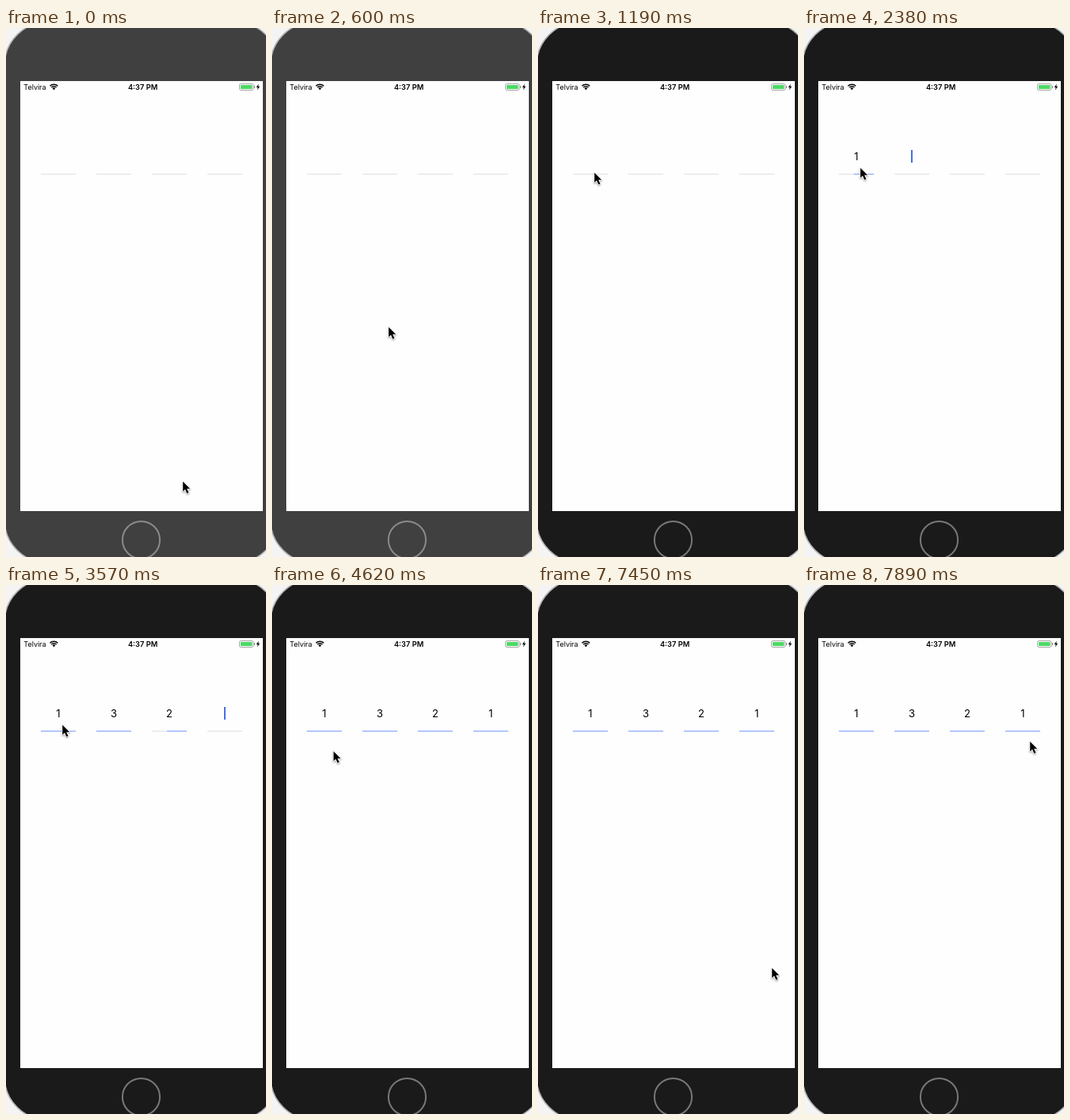
Write an HTML page with a canvas that moves like this. It is 328x668 px and loops after 8 s.

```html
<!DOCTYPE html>
<html lang="en">
<head>
<meta charset="utf-8">
<title>Passcode entry</title>
<style>
  html, body { margin: 0; width: 100%; height: 100%; overflow: hidden; background: #f4f4f4; }
  canvas { display: block; width: 328px; height: 668px; }
</style>
</head>
<body>
<canvas id="stage"></canvas>
<script>
const W = 328, H = 668, LOOP = 8000;
const canvas = document.getElementById('stage');
const ctx = canvas.getContext('2d');
const ratio = window.devicePixelRatio || 1;
canvas.width = W * ratio;
canvas.height = H * ratio;

const FOCUS = 1190, CARET_ON = 1340;
const FONT = 'Inter, Roboto, sans-serif';

// Each digit: value, then the share of its underline filled from a given time on
const digits = [
  { text: '1', fill: [[2380, .57], [2530, 1]] },
  { text: '3', fill: [[2970, .3], [3120, .85], [3270, 1]] },
  { text: '2', fill: [[3570, .57], [3720, 1]] },
  { text: '1', fill: [[3870, .57], [4020, 1]] }
];

const lerp = (a, b, k) => a + (b - a) * k;
const smooth = k => k * k * (3 - 2 * k);
const lastAt = (list, t) => list.filter(item => item[0] <= t).pop();

// Pointer moves in held steps along eased paths
function glide(times, from, to, ease) {
  return times.map((time, i) => {
    const k = ease((i + 1) / times.length);
    return [time, lerp(from[0], to[0], k), lerp(from[1], to[1], k)];
  });
}

const pointerPath = [
  [0, 222, 571],
  ...glide([300, 450, 600, 740, 890, 1040], [222, 571], [70, 181], smooth),
  [1490, 70, 175],
  ...glide([4620, 4770, 4920], [70, 175], [128, 473], k => k * k),
  [5050, null, null],
  [7450, 294, 482],
  [7600, 311, 372],
  [7750, 303, 252],
  [7890, 284, 196]
];

function rect(x, y, w, h, color) {
  ctx.fillStyle = color;
  ctx.fillRect(x, y, w, h);
}

function label(text, x, y, font, align) {
  ctx.font = font + ' ' + FONT;
  ctx.textAlign = align;
  ctx.fillStyle = '#000';
  ctx.fillText(text, x, y);
}

function drawDevice(active) {
  rect(0, 0, W, H, '#f4f4f4');
  ctx.beginPath();
  ctx.roundRect(-2, -7.7, 346, 683.4, 55);
  ctx.fillStyle = active ? '#1a1a1a' : '#404040';
  ctx.fill();
  ctx.strokeStyle = '#b4b4b4';
  ctx.lineWidth = 1.6;
  ctx.stroke();

  ctx.beginPath();
  ctx.arc(170.5, 646.5, 23.6, 0, Math.PI * 2);
  ctx.strokeStyle = active ? '#787878' : '#8a8a8a';
  ctx.lineWidth = 2;
  ctx.stroke();

  rect(18, 67, 306, 543, '#fefefe');
}

function drawWifi(x, y) {
  const from = -Math.PI * .75, to = -Math.PI * .25;
  ctx.strokeStyle = ctx.fillStyle = '#000';
  ctx.lineWidth = 1.5;
  for (const r of [4.5, 7]) {
    ctx.beginPath();
    ctx.arc(x, y, r, from, to);
    ctx.stroke();
  }
  ctx.beginPath();
  ctx.moveTo(x, y);
  ctx.arc(x, y, 2.7, from, to);
  ctx.fill();
}

function drawBattery() {
  ctx.beginPath();
  ctx.roundRect(294.5, 70.5, 17.5, 8, 1.8);
  ctx.strokeStyle = '#8e8e8e';
  ctx.lineWidth = .8;
  ctx.stroke();
  ctx.beginPath();
  ctx.roundRect(296, 72, 14.5, 5, .6);
  ctx.fillStyle = '#4cd964';
  ctx.fill();
  rect(313, 73, 1, 3, '#8e8e8e');
  ctx.fillStyle = '#000';
  ctx.fill(new Path2D('M318.8 70.5L315.8 75.1H317.7L316.9 78.6L320.2 73.8H318.2Z'));
}

function drawStatus() {
  label('Telvira', 22.3, 78, '400 9px', 'left');
  label('4:37 PM', 172.6, 78, '600 9.3px', 'center');
  drawWifi(60.4, 78.2);
  drawBattery();
}

function drawCaret(x, alpha) {
  ctx.globalAlpha = alpha;
  rect(x - 1, 154, 2, 16, '#476fe6');
  ctx.globalAlpha = 1;
}

function caretAlpha(t) {
  if (t < CARET_ON) return 0;
  if (t < 1790) return 1;
  if (t < 1940) return .5;
  return t < 2380 ? 0 : 1;
}

function drawFields(t) {
  const current = digits.findIndex(d => t < d.fill[0][0]);
  digits.forEach((digit, i) => {
    const left = 44 + 70 * i, mid = left + 22;
    const step = lastAt(digit.fill, t);
    rect(left, 184, 44, 1, '#e0e0e0');
    if (step) {
      const w = Math.round(44 * step[1]);
      rect(left + 44 - w, 184, w, 1, '#7a9dfb');
      label(digit.text, mid, 167, '400 13px', 'center');
    } else if (i === current) {
      drawCaret(mid, caretAlpha(t));
    }
  });
}

const arrow = new Path2D('M1.2 1.8V14.2L4 11.6L6.3 16.7L8.5 15.7L6.2 10.8H10.2Z');

function drawPointer(t) {
  const [, x, y] = lastAt(pointerPath, t);
  if (x === null) return;
  ctx.save();
  ctx.translate(x, y);
  ctx.lineJoin = 'round';
  ctx.lineWidth = 1.8;
  ctx.strokeStyle = '#fff';
  ctx.shadowColor = 'rgba(0,0,0,.4)';
  ctx.shadowBlur = 2 * ratio;
  ctx.shadowOffsetY = ratio;
  ctx.stroke(arrow);
  ctx.shadowColor = 'transparent';
  ctx.fillStyle = '#000';
  ctx.fill(arrow);
  ctx.restore();
}

function draw(t) {
  ctx.setTransform(ratio, 0, 0, ratio, 0, 0);
  drawDevice(t >= FOCUS);
  drawStatus();
  drawFields(t);
  drawPointer(t);
}

const start = performance.now();
function tick() {
  draw((performance.now() - start) % LOOP);
  requestAnimationFrame(tick);
}
tick();
</script>
</body>
</html>
```
